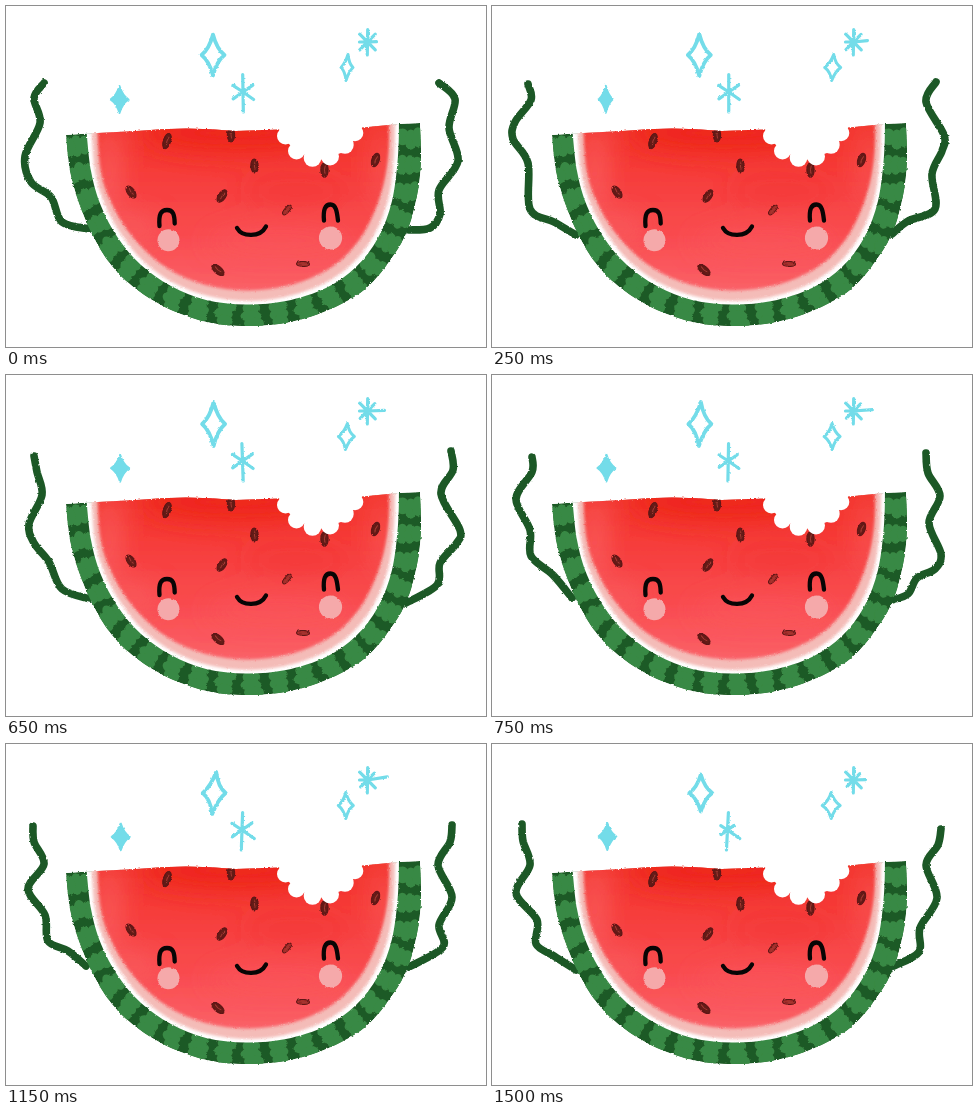
Recreate the animation shown at these times as an HTML page. Size 480 px wide and 341 px high, loop 1750 ms.

```html
<!DOCTYPE html>
<html lang="en">
<head>
<meta charset="utf-8">
<title>Happy watermelon</title>
<style>
html, body { margin: 0; width: 100%; height: 100%; overflow: hidden; background: #fff; }
svg { display: block; width: 100%; height: 100%; }
.line { fill: none; stroke-linecap: round; stroke-linejoin: round; }
</style>
</head>
<body>
<svg viewBox="0 0 480 341">
  <defs>
    <filter id="rough" filterUnits="userSpaceOnUse" x="0" y="0" width="480" height="341">
      <feTurbulence type="fractalNoise" baseFrequency=".35" numOctaves="2" seed="4"/>
      <feDisplacementMap in="SourceGraphic" scale="2.4" xChannelSelector="R" yChannelSelector="G"/>
    </filter>
    <filter id="soft" x="-10%" y="-10%" width="120%" height="120%"><feGaussianBlur stdDeviation="1.8"/></filter>
    <filter id="wash" x="-60%" y="-60%" width="220%" height="220%"><feGaussianBlur stdDeviation="13"/></filter>
    <linearGradient id="red" x1="0" y1="0" x2="0" y2="1">
      <stop offset="0" stop-color="#f23228"/>
      <stop offset=".35" stop-color="#f63d3b"/>
      <stop offset=".7" stop-color="#f94d51"/>
      <stop offset="1" stop-color="#fa6067"/>
    </linearGradient>
    <clipPath id="rindClip"><path id="rindShape"/></clipPath>
    <clipPath id="fleshClip"><path id="fleshShape"/></clipPath>
  </defs>
  <g id="arms" class="line" stroke="#1d5927" stroke-width="7.6" filter="url(#rough)">
    <path id="leftArm"/><path id="rightArm"/>
  </g>
  <g filter="url(#rough)">
    <g clip-path="url(#rindClip)">
      <path id="rind" fill="#1f5a26"/>
      <g id="patches" fill="#398944"/>
      <path id="pith" fill="#fff"/>
      <path id="blush" fill="#f4bcb8" filter="url(#soft)"/>
      <path id="flesh" fill="url(#red)" filter="url(#soft)"/>
      <g clip-path="url(#fleshClip)">
        <g filter="url(#wash)">
          <ellipse cx="232" cy="127" rx="100" ry="20" fill="#ee2417" opacity=".85"/>
          <ellipse cx="103" cy="165" rx="9" ry="48" fill="#fc757b" opacity=".7"/>
          <ellipse cx="377" cy="160" rx="8" ry="45" fill="#fb686c" opacity=".6"/>
          <ellipse cx="130" cy="222" rx="22" ry="13" fill="#fb666b" opacity=".6"/>
          <ellipse cx="275" cy="235" rx="75" ry="14" fill="#fc5b60" opacity=".5"/>
          <ellipse cx="290" cy="185" rx="55" ry="13" fill="#f22f2d" opacity=".45"/>
        </g>
      </g>
      <g id="seeds"></g>
    </g>
  </g>
  <g id="bite" fill="#fff"><path d="M270 112H358L355 126L338 146L314 154L291 146L275 130Z"/></g>
  <g fill="#f5a9aa" filter="url(#rough)">
    <circle cx="162.5" cy="234.3" r="11"/><circle cx="324.5" cy="232" r="11.6"/>
  </g>
  <g class="line" stroke="#080505" stroke-width="4.3">
    <path d="M153.5 220C152.5 208 155 204 161 204C167 204 168.5 208 168.700 217.500"/>
    <path d="M318 214.500C317 204 319 198.500 324.500 198.500C330 198.500 331 206 332 214.500"/>
    <path d="M231 222C236 231 254 232 260 220.500"/>
  </g>
  <g id="sparkles" class="line" stroke="#73dce9" filter="url(#rough)">
    <path id="solid" fill="#73dce9" stroke-width="2"/>
    <path id="tall" stroke-width="3.8"/>
    <path id="small" stroke-width="3"/>
    <path id="lowBurst" stroke-width="3.2"/>
    <path id="highBurst" stroke-width="3.2"/>
  </g>
</svg>
<script>
const STEP = 250, POSES = 7;
const byId = id => document.getElementById(id);
const draw = (id, d) => byId(id).setAttribute('d', d);

function add(parent, tag, attrs) {
  const el = document.createElementNS('http://www.w3.org/2000/svg', tag);
  for (const key in attrs) el.setAttribute(key, attrs[key]);
  return byId(parent).appendChild(el);
}

// Catmull-Rom curve through "x,y x,y ..."
function curve(text) {
  const p = text.split(' ').map(s => s.split(',').map(Number));
  let d = 'M' + p[0];
  for (let i = 0; i < p.length - 1; i++) {
    const a = p[i - 1] || p[i], b = p[i], c = p[i + 1], e = p[i + 2] || c;
    d += `C${b.map((v, k) => v + (c[k] - a[k]) / 6)} ${c.map((v, k) => v - (e[k] - b[k]) / 6)} ${c}`;
  }
  return d;
}

const top_ = 'L392 118L357 121.500L276 123.500L230 125Q180 120 130 125L82 127.500';
const rind = curve('60,129 64,165 73,197 86,228 105,259 130,283 165,304 205,317 245,320 285,316 325,303 358,284 380,260 400,228 411,190 415,155 414,117') + top_ + 'Z';
const pith = curve('80,120 85,165 95,200 112,232 135,259 165,280 200,294 240,298.5 280,295 320,282 350,261 372,232 386,195 392,150 393,110') + 'Z';
const blush = curve('85,115 89,165 99,199 117,231 139,257 168,277 202,290 240,295 279,291 317,278 347,257 368,229 382,194 388,150 389,110') + 'Z';
const flesh = curve('91,115 95,165 106,198 126,230 155,258 190,276 230,284 270,282 305,272 335,254 359,225 375,187 382,150 383,110') + 'Z';
['rindShape', 'rind'].forEach(id => draw(id, rind));
['fleshShape', 'flesh'].forEach(id => draw(id, flesh));
draw('pith', pith);
draw('blush', blush);

// Lumpy light patches spaced along the middle of the rind
const spine = document.createElementNS('http://www.w3.org/2000/svg', 'path');
spine.setAttribute('d', curve('70,128 75,165 84,199 99,230 120,259 148,281 183,299 240,309 285,305 323,292 355,272 376,246 393,211 402,170 404,117'));
const length = spine.getTotalLength(), count = 21;
for (let i = 0; i < count; i++) {
  const s = (i + .45) / count * length;
  const p = spine.getPointAtLength(s), q = spine.getPointAtLength(s + 1);
  const angle = Math.atan2(q.y - p.y, q.x - p.x) * 180 / Math.PI;
  [[0, -7, 9.2, 6.5], [-1, 1, 10, 6], [1, 8, 9, 6]].forEach(([x, y, rx, ry], k) =>
    add('patches', 'ellipse', {
      cx: x + Math.sin(i * 2.3 + k * 2), cy: y, rx: rx + Math.sin(i * 3.1 + k), ry,
      transform: `translate(${p.x} ${p.y}) rotate(${angle})`
    }));
}

// x, y, half length, tilt
[[161, 135, 8, 18], [225, 129, 7, 0], [248.5, 160, 7, -4], [216, 190, 7, 35], [125, 186, 7, -36],
 [281, 204, 6, 42], [212, 264, 7.5, -50], [297, 258, 6.5, 92], [318.5, 164, 7.500, 0], [369.500, 154, 7, 20]
].forEach(([x, y, r, tilt], i) => {
  const transform = `translate(${x} ${y}) rotate(${tilt})`;
  const pale = i === 5 || i === 7;
  add('seeds', 'ellipse', { rx: pale ? 2.4 : 3.7, ry: r, fill: pale ? '#a52d2a' : '#641a17',
    stroke: '#5b1715', 'stroke-width': 1, transform });
  add('seeds', 'path', { d: `M.8 ${-r * .6}Q-.8 0 .6 ${r * .5}`, fill: 'none', stroke: '#a43a34', 'stroke-width': 1, transform });
});

[[279.5, 130, 8.5], [290.500, 145, 8.5], [306.5, 152, 8.8], [324, 150.500, 9], [339, 139, 8.700], [349, 127, 8.3]]
  .forEach(([cx, cy, r]) => add('bite', 'circle', { cx, cy, r }));

const leftArms = [
  '38,77 28,92 34,117 19,150 25,176 45,191 56,216 84,223',
  '36,78 39,94 23,116 21,133 36,157 38,203 62,216 84,229',
  '28,81 31,97 36,120 23,149 28,168 43,187 56,214 84,224',
  '40,82 40,97 24,124 38,155 39,181 61,200 80,223',
  '27,82 28,98 38,120 22,145 39,171 42,197 62,207 80,222',
  '41,81 42,96 24,121 36,155 35,183 51,200 63,215 84,223',
  '30,80 31,97 38,121 24,149 45,176 44,200 62,212 84,226'
].map(curve);
const rightArms = [
  '433,77 449,93 443,122 452,155 433,184 434,208 424,222 403,224',
  '444,76 434,96 452,129 450,145 440,168 443,203 416,215 400,228',
  '445,76 447,95 435,119 454,155 450,169 434,188 431,210 400,228',
  '434,78 436,98 448,121 437,148 449,179 443,194 425,203 416,219 400,225',
  '446,81 444,98 432,121 446,153 433,181 437,203 403,223',
  '438,84 443,102 444,130 433,154 440,177 424,202 420,215 402,220',
  '449,85 446,101 434,121 445,154 428,184 427,208 402,222'
].map(curve);

function star(x, y, w, h, lean = 0) {
  const a = w * .32, b = h * .3;
  return `M${x + lean} ${y - h}Q${x + a} ${y - b} ${x + w} ${y}Q${x + a} ${y + b} ${x - lean} ${y + h}` +
    `Q${x - a} ${y + b} ${x - w} ${y}Q${x - a} ${y - b} ${x + lean} ${y - h}Z`;
}

// Each ray is [angle in degrees clockwise from up, length]
const burst = (x, y, rays) => rays.map(([deg, r]) => {
  const t = deg * Math.PI / 180;
  return `M${x} ${y}l${r * Math.sin(t)} ${-r * Math.cos(t)}`;
}).join('');

const lowTilt = [-1, 0, -2, 1, 2, 4, 3];
const lowSide = [12, 12, 12, 11, 12, 9, 8];
const highReach = [9, 14, 17, 19, 20, 21, 12];
const highAngle = [88, 84, 88, 86, 81, 80, 88];

function render(time) {
  const i = Math.floor(time / STEP) % POSES, u = i / (POSES - 1);
  draw('leftArm', leftArms[i]);
  draw('rightArm', rightArms[i]);

  draw('solid', star(113.500 + 1.8 * u, 93.5 - u, i === 1 ? 7 : 9, 13.5));
  draw('tall', star(207 + 1.8 * u, 49, 11.5, [20.5, 21, 22, 22, 21, 19.500, 18.500][i], [0, 0, 0, 1, 2, 1, 0][i]));
  draw('small', star(341 - 1.8 * u, 61.5, [6, 8, 8, 8, 7.5, 8, 9][i], 13, [1, 1, 1, 0, 0, 0, 0][i]));

  const tilt = lowTilt[i], side = lowSide[i];
  draw('lowBurst', burst(237 - 1.5 * u, 86, [
    [tilt, 17.5], [180 + tilt, 20], [55, side], [125, i > 3 ? 15 : 13], [235, side], [303, side]
  ]));
  const spoke = 11 - 2 * u;
  draw('highBurst', burst(361.5, 36, [
    [1, 12.5], [181, 13], [45, spoke], [highAngle[i], highReach[i]], [135, 11],
    [225, spoke], [270, 8], [315, 11]
  ]));
}

let start;
function tick(now) {
  start ??= now;
  render(now - start);
  requestAnimationFrame(tick);
}
render(0);
requestAnimationFrame(tick);
</script>
</body>
</html>
```
